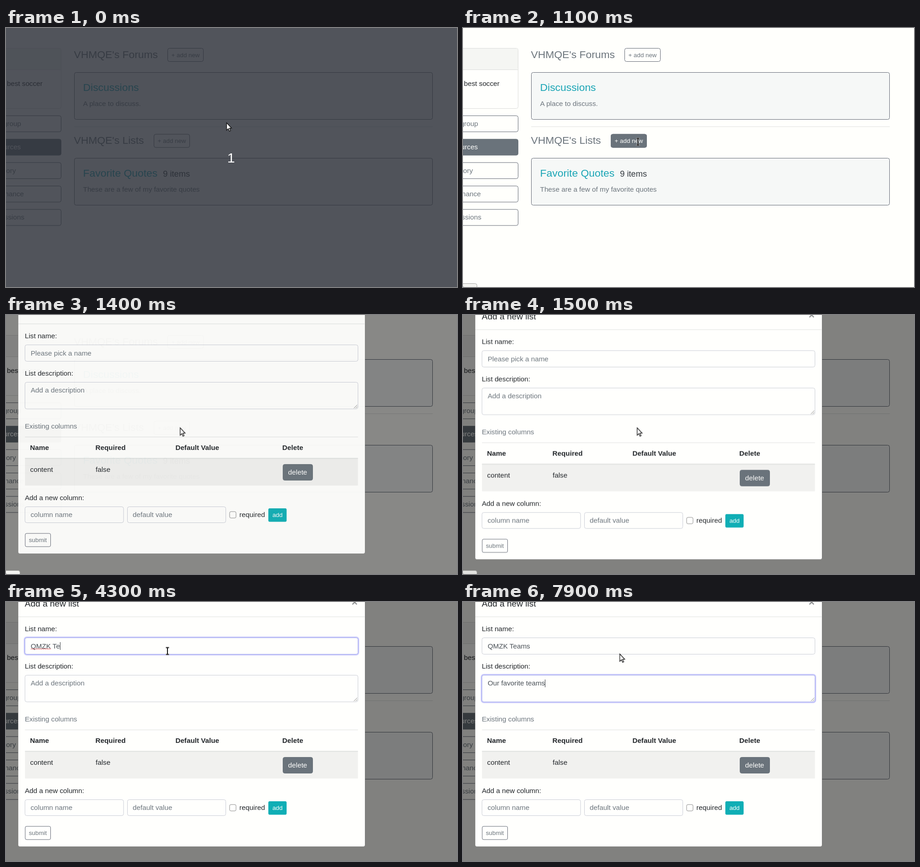
These frames come from a looping animation (986x568 px, 8 s). An HTML page:

```html
<!DOCTYPE html>
<html lang="en">
<head>
<meta charset="utf-8">
<title>Add a new list</title>
<style>
html, body { margin: 0; width: 100%; height: 100%; overflow: hidden; background: #fffffc; }
svg { display: block; width: 986px; height: 568px; }
text { font: 15.24px "Liberation Sans", Arial, sans-serif; fill: #212529; white-space: pre; }
rect { rx: 4px; }
.grey { fill: #6c757d; }
.h { font-size: 22.86px; fill: #6c757d; }
.link { font-size: 22.86px; fill: #1aa5b5; }
.sm { font-size: 13.33px; fill: #6c757d; }
.b { font-weight: bold; }
.typed { fill: #495057; }
.mid { text-anchor: middle; }
.end { text-anchor: end; }
.light { fill: #fffffd; }
.btn { fill: none; stroke: #636975; }
.solid { fill: #6a737b; stroke: #6a737b; }
.card { fill: #f6f8f7; stroke: #636975; }
.field { fill: #fffffd; stroke: #cacdd6; }
.line { stroke: #dfe1e0; }
.ring { fill: none; stroke: #cacafb; stroke-width: 5.4; }
.edge { fill: #fffffd; stroke: #a2a8ec; }

.anim { animation: 8s step-end infinite; }
#count { animation-name: count; }
#hover { animation-name: hover; }
#shade { animation-name: shade; }
#modal { animation-name: modal; }
#bubble { animation-name: bubble; }
#focus1 { animation-name: focus1; }
#focus2 { animation-name: focus2; }
#cursor { animation-name: move; }
#arrow { animation-name: arrow; }
#beam { animation-name: beam; }

@keyframes count { 0% { opacity: 1 } 6.25%, 100% { opacity: 0 } }
@keyframes hover { 0% { opacity: 0 } 12.5% { opacity: .7 } 13.75% { opacity: 1 } 17.5%, 100% { opacity: 0 } }
@keyframes shade { 0% { opacity: 0 } 16.25% { opacity: .11 } 17.5% { opacity: .47 } 18.75%, 100% { opacity: .495 } }
@keyframes modal {
  0% { opacity: 0; transform: translateY(-47.6px) }
  16.25% { opacity: .23; transform: translateY(-39px) }
  17.5% { opacity: .95; transform: translateY(-13px) }
  18.75% { opacity: 1; transform: translateY(-.4px) }
  20%, 100% { opacity: 1; transform: none }
}
@keyframes bubble { 0% { opacity: 0 } 13.75% { opacity: 1 } 18.75% { opacity: .85 } 20% { opacity: .4 } 21.25%, 100% { opacity: 0 } }
@keyframes focus1 { 0% { opacity: 0 } 28.75% { opacity: .6 } 30% { opacity: 1 } 70% { opacity: .4 } 71.25%, 100% { opacity: 0 } }
@keyframes focus2 { 0% { opacity: 0 } 70% { opacity: .6 } 71.25%, 100% { opacity: 1 } }
@keyframes move {
  0% { transform: translate(482px, 208px) }
  6.25% { transform: translate(482px, 208px); animation-timing-function: steps(6) }
  13.75% { transform: translate(382.5px, 249.5px) }
  17.5% { transform: translate(380.5px, 247.5px) }
  18.75% { transform: translate(380.5px, 247.5px); animation-timing-function: steps(6) }
  26.25% { transform: translate(354px, 113px) }
  28.75% { transform: translate(353px, 107.5px) }
  98.75%, 100% { transform: translate(342.5px, 114px) }
}
@keyframes arrow {
  0% { opacity: 1 } 13.75% { opacity: 0 } 17.5% { opacity: 1 } 21.25% { opacity: 0 }
  23.75% { opacity: 1 } 26.25% { opacity: 0 } 98.75%, 100% { opacity: 1 }
}
@keyframes beam {
  0% { opacity: 0 } 13.75% { opacity: 1 } 17.5% { opacity: 0 } 21.25% { opacity: 1 }
  23.75% { opacity: 0 } 26.25% { opacity: 1 } 98.75%, 100% { opacity: 0 }
}
</style>
</head>
<body>
<svg viewBox="0 0 986 568" xmlns="http://www.w3.org/2000/svg">
  <!-- sidebar -->
  <rect x="-20" y="44.5" width="140.5" height="132" fill="#fffffd" stroke="#dcdddb"/>
  <rect x="-20" y="45" width="140" height="46" fill="#f5f6f3"/>
  <path d="M0 91.5H120" stroke="#dcdddb"/>
  <text x="2" y="127">best soccer</text>
  <g id="menu"></g>

  <!-- forums and lists -->
  <text class="h" x="148.5" y="66">VHMQE's Forums</text>
  <rect class="btn" x="353.5" y="44.5" width="78" height="29"/>
  <text class="sm" x="361.6" y="63.5">+ add new</text>
  <rect class="card" x="149.5" y="97.5" width="783" height="103"/>
  <text class="link" x="168.6" y="138">Discussions</text>
  <text class="grey" x="168.6" y="171">A place to discuss.</text>
  <path class="line" d="M149 216.5H933"/>
  <text class="h" x="148.5" y="254">VHMQE's Lists</text>
  <rect class="btn" x="323.5" y="233" width="78" height="29"/>
  <text class="sm" x="331.6" y="251.5">+ add new</text>
  <g id="hover" class="anim">
    <rect class="solid" x="323.5" y="233" width="78" height="29"/>
    <text class="sm light" x="331.6" y="251.5">+ add new</text>
  </g>
  <rect class="card" x="149.5" y="285.5" width="783" height="103"/>
  <text class="link" x="168.6" y="326">Favorite Quotes</text>
  <text x="343.2" y="326" style="font-size:18.29px;fill:#343a40">9 items</text>
  <text class="grey" x="168.6" y="359">These are a few of my favorite quotes</text>

  <path id="shade" class="anim" d="M0 0H986V568H0Z"/>

  <g id="modal" class="anim">
    <rect x="26.5" y="-28" width="758.5" height="564.5" fill="#fffffd" stroke="#000" stroke-opacity=".25"/>
    <text x="41" y="9.5" style="font-size:19.05px">Add a new list</text>
    <text class="b" x="755.4" y="8" style="font-size:22.86px" opacity=".5">×</text>
    <path class="line" d="M27 32.5H784.5"/>

    <text x="41.2" y="64.4">List name:</text>
    <rect class="field" x="41.5" y="78.5" width="728" height="36"/>
    <g id="focus1" class="anim">
      <rect class="ring" x="41.5" y="78.5" width="728" height="36"/>
      <rect class="edge" x="41.5" y="78.5" width="728" height="36"/>
    </g>
    <text id="name" x="53.9" y="101.6"></text>
    <path id="squiggle" fill="none" stroke="#e0393e" stroke-width=".9"/>

    <text x="41.2" y="146.4">List description:</text>
    <rect class="field" x="41.5" y="160.5" width="728" height="58.5"/>
    <g id="focus2" class="anim">
      <rect class="ring" x="41.5" y="160.5" width="728" height="58.5"/>
      <rect class="edge" x="41.5" y="160.5" width="728" height="58.5"/>
    </g>
    <path d="M760.5 217.5L768 210M764.5 217.5L768 214" stroke="#777" stroke-width=".9"/>
    <text id="desc" x="53.9" y="183.4"></text>
    <path id="caret" d="M.5 0V17" stroke="#33383d"/>

    <text class="grey" x="41.2" y="262">Existing columns</text>
    <path class="line" d="M41.5 280.5H769.5"/>
    <path d="M41.5 328H769.5V387H41.5Z" fill="#f1f1ef"/>
    <path class="line" d="M41.5 327.5H769.5" stroke-width="2"/>
    <text class="b" x="52.6" y="309">Name</text>
    <text class="b" x="195.6" y="309">Required</text>
    <text class="b" x="370.4" y="309">Default Value</text>
    <text class="b" x="604" y="309">Delete</text>
    <text x="52.8" y="356.6">content</text>
    <text x="196" y="356.6">false</text>
    <rect class="solid" x="605.5" y="340.5" width="65" height="35"/>
    <text class="light mid" x="637.6" y="363">delete</text>

    <text x="41.2" y="419">Add a new column:</text>
    <rect class="field" x="41.5" y="433.5" width="215.5" height="35"/>
    <text class="grey" x="53.7" y="456">column name</text>
    <rect class="field" x="265.5" y="433.5" width="215" height="35"/>
    <text class="grey" x="277" y="456">default value</text>
    <rect x="488.9" y="444.2" width="14" height="14" fill="#fffffd" stroke="#8b8b8b" style="rx:3px"/>
    <text x="510.3" y="456">required</text>
    <rect x="574" y="437.5" width="39" height="28.5" fill="#10aeb5" stroke="#10aeb5" style="rx:2px"/>
    <text class="sm light mid" x="593.5" y="456">add</text>
    <rect class="btn" x="42" y="492" width="55.5" height="29" style="rx:3px"/>
    <text class="sm mid" x="69.6" y="511">submit</text>
  </g>

  <g id="bubble" class="anim">
    <rect x="-6" y="560.5" width="36.5" height="20" fill="#f4f4f1" stroke="#a5a5a2"/>
    <text class="sm" x="-2" y="576">/</text>
  </g>

  <g id="count" class="anim">
    <path d="M0 0H986V568H0Z" fill="rgb(43,47,56)" fill-opacity=".82"/>
    <text class="mid" x="492" y="295" style="font-size:30px;fill:#fff">1</text>
  </g>

  <g id="cursor" class="anim">
    <path id="arrow" class="anim" d="M.3 0V16.2L4 12.7 6.4 18.3 8.9 17.2 6.5 11.7H11.2Z" fill="#fff" stroke="#111" stroke-width="1.3"/>
    <g id="beam" class="anim" fill="none">
      <path d="M-4-7.5H4M0-7.5V7.5M-4 7.5H4" stroke="#fff" stroke-width="3"/>
      <path d="M-3.5-7.5H3.5M0-7.5V7.5M-3.5 7.5H3.5" stroke="#111" stroke-width="2"/>
    </g>
  </g>
</svg>
<script>
const $ = id => document.getElementById(id);

// label and the x where its right end falls
const menu = [["Join group", 33], ["Resources", 32.5], ["History", 21.5], ["Governance", 39], ["Permissions", 40]];
$("menu").innerHTML = menu.map(([label, x], i) => {
  const y = 192.4 + 51.35 * i;
  return `<rect class="${i === 1 ? "solid" : "btn"}" x="-20" y="${y}" width="140.5" height="35.3"/>
    <text class="end ${i === 1 ? "light" : "grey"}" x="${x}" y="${Math.round(y + 22.5)}">${label}</text>`;
}).join("");

$("squiggle").setAttribute("d", "M54 104" + "l2-2 2 2".repeat(11));

// [time, text] pairs; each text holds until the next time
const nameKeys = [[0, ""], [2800, "Q"], [2900, "QM"], [3000, "QMZK"], [3200, "QMZK "], [4100, "QMZK T"],
  [4300, "QMZK Te"], [4500, "QMZK Tea"], [4600, "QMZK Teas"], [5000, "QMZK Tea"],
  [5200, "QMZK Team"], [5300, "QMZK Teams"]];
const phrase = "Our favorite teams";
const descKeys = [[0, 0], [5900, 1], [6100, 2], [6200, 3], [6300, 4], [6400, 5], [6500, 6], [6600, 7],
  [6700, 8], [6900, 10], [7100, 12], [7200, 14], [7400, 16], [7600, 18]]
  .map(([at, n]) => [at, phrase.slice(0, n)]);

const valueAt = (keys, t) => keys.filter(([at]) => at <= t).pop()[1];
const within = (t, from, to) => t >= from && t < to;

function fill(el, value, hint) {
  const shown = value || hint;
  if (el.textContent !== shown) el.textContent = shown;
  el.setAttribute("class", value ? "typed" : "grey");
  return Math.round(53.9 + (value ? el.getComputedTextLength() : 0));
}

function draw(t) {
  const nameEnd = fill($("name"), valueAt(nameKeys, t), "Please pick a name");
  const descEnd = fill($("desc"), valueAt(descKeys, t), "Add a description");
  const inDesc = t >= 5600;
  $("squiggle").style.opacity = within(t, 3200, 5600) ? 1 : 0;
  $("caret").style.opacity = t >= 2300 && !within(t, 3800, 4100) ? 1 : 0;
  $("caret").setAttribute("transform", inDesc ? `translate(${descEnd} 170)` : `translate(${nameEnd} 88)`);
}

let start;
function tick(now) {
  start ??= now;
  draw((now - start) % 8000);
  requestAnimationFrame(tick);
}
draw(0);
requestAnimationFrame(tick);
</script>
</body>
</html>
```
